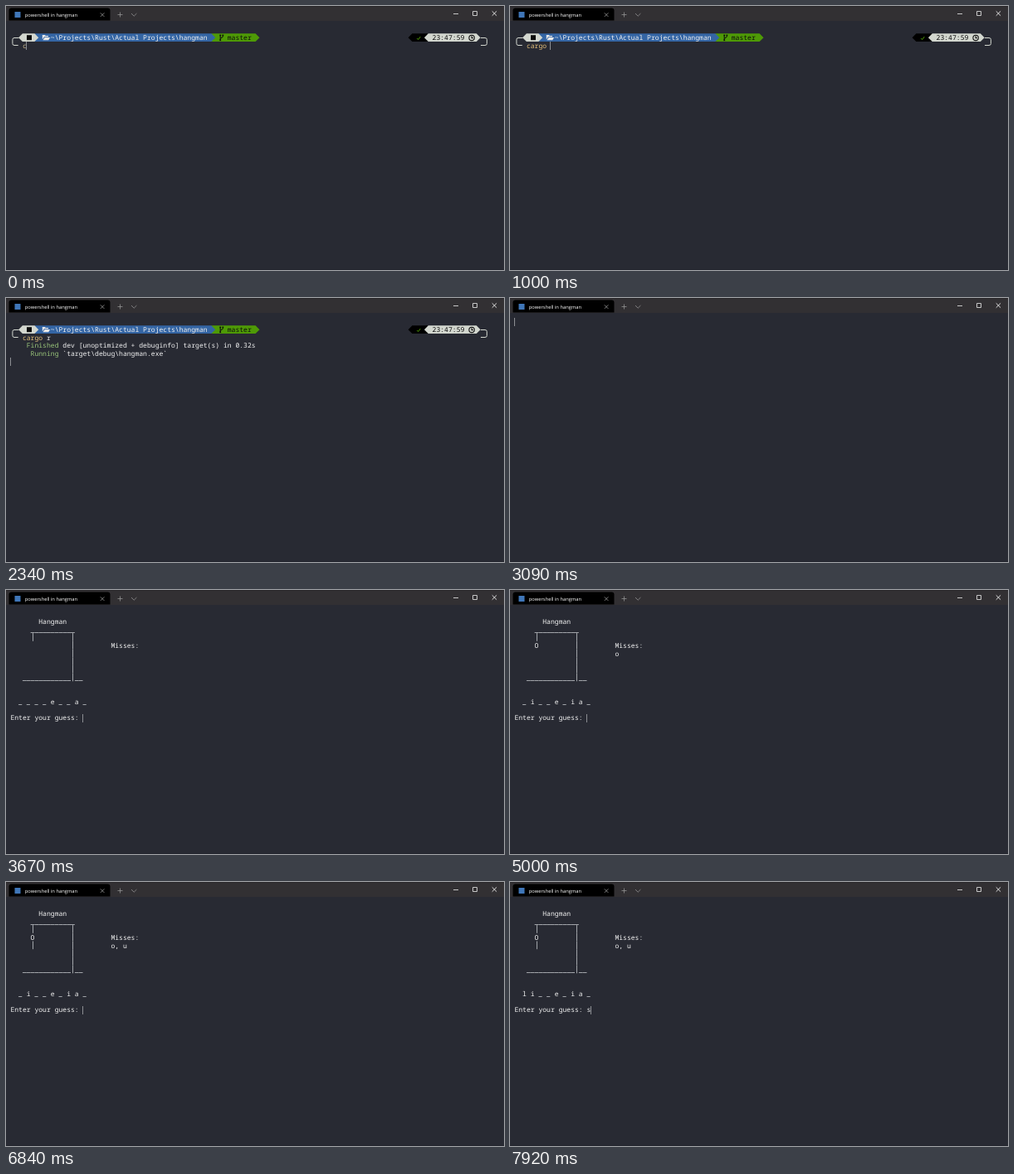
An HTML page with a canvas for the animation above (8000 ms loop, 600x319 px).

```html
<!DOCTYPE html>
<html lang="en">
<head>
<meta charset="utf-8">
<title>Hangman in a terminal</title>
<style>
  html, body { margin: 0; height: 100%; overflow: hidden; background: #282a33; }
  canvas { display: block; }
</style>
</head>
<body>
<canvas id="stage" width="600" height="319"></canvas>
<script>
const ctx = document.getElementById('stage').getContext('2d');
const LOOP = 8000, CELL = 4.84, ROW = 9.7;
const WHITE = '#f2f2f2', YELLOW = '#e5c07b', GREEN = '#98c379', RULE = '#a2a5aa';
const PALE = '#d3d7cf', BLUE = '#3465a4', LEAF = '#4e9a06', INK = '#0c0c0c';

const colX = col => 5.4 + col * CELL;
const rowY = row => 23.6 + row * ROW;
const midY = row => rowY(row) + ROW / 2;

// Timeline in ms
const TYPED = [0, 170, 340, 500, 670, 840, 1170];
const ENTER = 1420, OUTPUT = 1750, GAME = 2500;
const COMMAND = 'cargo r', WORD = 'l i _ _ e _ i a _';
const GUESSES = [
  { key: 'a', typed: 2840, cleared: 3090, shown: 3170 },
  { key: 'e', typed: 3420, cleared: 3590, shown: 3670 },
  { key: 'i', typed: 4170, shown: 4340 },
  { key: 'o', typed: 4590, shown: 4750 },
  { key: 'u', typed: 5340, shown: 5670 },
  { key: 'l', typed: 7250, shown: 7500 },
  { key: 's', typed: 7920, shown: LOOP },
];
const CURSOR_OFF = [[5250, 5340], [6250, 6750]];

const during = (t, from, to) => t >= from && t < to;

function rect(color, x, y, w, h) {
  ctx.fillStyle = color;
  ctx.fillRect(x, y, w, h);
}

function shape(color, ...points) {
  ctx.fillStyle = color;
  ctx.beginPath();
  for (const [x, y] of points) ctx.lineTo(x, y);
  ctx.fill();
}

function stroke(color, width, path) {
  ctx.strokeStyle = color;
  ctx.lineWidth = width;
  ctx.stroke(new Path2D(path));
}

// Monospaced text on the cell grid; bars and underscores join into lines
function print(text, col, row, color = WHITE) {
  ctx.font = '500 8.07px "Noto Sans Mono", "DejaVu Sans Mono", monospace';
  [...text].forEach((char, i) => {
    const x = colX(col + i);
    if (char === '|') rect(RULE, Math.round(x + 1.9), rowY(row) - .6, 1, ROW);
    else if (char === '_') rect(RULE, x, Math.round(midY(row) + 2.8), text.includes('__') ? CELL : 4.2, 1);
    else {
      ctx.fillStyle = color;
      ctx.fillText(char, x, midY(row) + 2.8);
    }
  });
}

function cursor(col, row) {
  rect('#8c8e93', Math.floor(colX(col)), Math.round(rowY(row)), 1, 10);
}

// A prompt segment between two columns, optionally with pointed ends
function segment(color, from, to, leftTip, rightTip) {
  const top = rowY(1), mid = midY(1), bottom = rowY(2), a = colX(from), b = colX(to);
  const points = [[a, top], [b, top]];
  if (rightTip) points.push([b + CELL, mid]);
  points.push([b, bottom], [a, bottom]);
  if (leftTip) points.push([a - CELL, mid]);
  shape(color, ...points);
}

function drawWindow() {
  rect('#282a33', 0, 0, 600, 319);
  rect('#323033', 0, 0, 600, 18);
  rect('#29272a', 0, 0, 600, 1);
  rect('#23252e', 0, 318, 600, 1);
  ctx.fillStyle = '#000';
  ctx.beginPath();
  ctx.roundRect(3.5, 2.5, 122, 15, [3, 3, 0, 0]);
  ctx.fill();
  rect('#3f76b8', 10.5, 7, 7, 7);
  ctx.font = '5.8px "Open Sans", "Noto Sans", sans-serif';
  ctx.fillStyle = '#fff';
  ctx.fillText('powershell in hangman', 22.8, 12.7);
  stroke('#b0b0b0', .7, 'M113.8 8.3l4.6 4.6m0-4.6l-4.6 4.6');
  stroke('#929292', .8, 'M134.5 10.5h6m-3-3v6M151 9l3.2 3.2 3.2-3.2');
  stroke('#c8c8c8', 1, 'M539 9.5h6M562.5 6.5h5v5h-5z');
  stroke('#f0f0f0', .9, 'M585.7 6.3l5.4 5.4m0-5.4l-5.4 5.4');
}

function drawPrompt() {
  stroke(PALE, 1, 'M15.5 38.5H10Q7.9 38.5 7.9 40.5V45.5Q7.9 47.5 10 47.5H14.7');
  stroke(PALE, 1, 'M572 38.5H577Q579.4 38.5 579.4 40.5V45.5Q579.4 47.5 577 47.5H572');

  segment(LEAF, 50, 61, false, true);
  segment(BLUE, 6, 50, false, true);
  segment(PALE, 3, 6, true, true);
  segment('#000', 100, 104, true, false);
  segment(PALE, 104, 116, true, true);

  rect(INK, 25, 35.2, 6, 6);
  shape('#e8e8e8', [43.8, 40.5], [43.8, 35], [46.8, 35], [47.8, 36], [51, 36], [51, 37.3], [46, 37.3]);
  shape('#e8e8e8', [46.6, 38], [53.2, 38], [51.2, 41.3], [44.4, 41.3]);
  print('~\\Projects\\Rust\\Actual Projects\\hangman', 10, 1);

  stroke(INK, 1, 'M258.2 35.5v6M261.3 35.5v1.2q0 1.6-3.1 2.4');
  for (const [x, y] of [[257.4, 34.6], [260.5, 34.6], [257.4, 40.4]]) rect(INK, x, y, 1.7, 1.7);
  print('master', 54, 1, INK);

  stroke(LEAF, 1, 'M495.2 39l1.4 1.6 2.7-3.6');
  print('23:47:59', 105, 1, INK);
  stroke(INK, 1.1, 'M564.3 38.4a3.2 3.2 0 1 1-6.4 0a3.2 3.2 0 1 1 6.4 0M561.1 36.2v2.4h1.7');
}

function drawShell(t) {
  drawPrompt();
  const count = TYPED.filter(at => t >= at).length;
  print(COMMAND.slice(0, Math.min(count, 5)), 3, 2, count > 1 ? YELLOW : '#c9b78c');
  if (count > 6) print('r', 9, 2);
  if (t < ENTER) return cursor(3 + count, 2);
  if (t < OUTPUT) return cursor(0, 3);
  print('Finished', 4, 3, GREEN);
  print('dev [unoptimized + debuginfo] target(s) in 0.32s', 13, 3);
  print('Running', 5, 4, GREEN);
  print('`target\\debug\\hangman.exe`', 13, 4);
  cursor(0, 5);
}

function drawGame(t) {
  if (GUESSES.some(g => g.cleared && during(t, g.cleared, g.shown))) return cursor(0, 0);
  const guessed = GUESSES.filter(g => t >= g.shown).map(g => g.key);
  const misses = guessed.filter(key => !WORD.includes(key));
  const pending = GUESSES.find(g => during(t, g.typed, g.shown));

  print('Hangman', 7, 1);
  print('___________', 5, 2);
  print('|', 5, 3);
  for (let row = 3; row < 8; row++) print('|', 15, row);
  print('____________|__', 3, 8);
  if (misses.length > 0) print('O', 5, 4);
  if (misses.length > 1) print('|', 5, 5);

  print('Misses:', 25, 4);
  print(misses.join(', '), 25, 5);
  print(WORD.replace(/[a-z]/g, c => guessed.includes(c) ? c : '_'), 2, 11);
  print('Enter your guess:', 0, 13);
  if (pending) print(pending.key, 18, 13);
  if (!CURSOR_OFF.some(([from, to]) => during(t, from, to))) cursor(pending ? 19 : 18, 13);
}

function frame() {
  const t = performance.now() % LOOP;
  ctx.textRendering = 'geometricPrecision';
  drawWindow();
  if (t < GAME) drawShell(t);
  else drawGame(t);
  requestAnimationFrame(frame);
}
frame();
</script>
</body>
</html>
```
